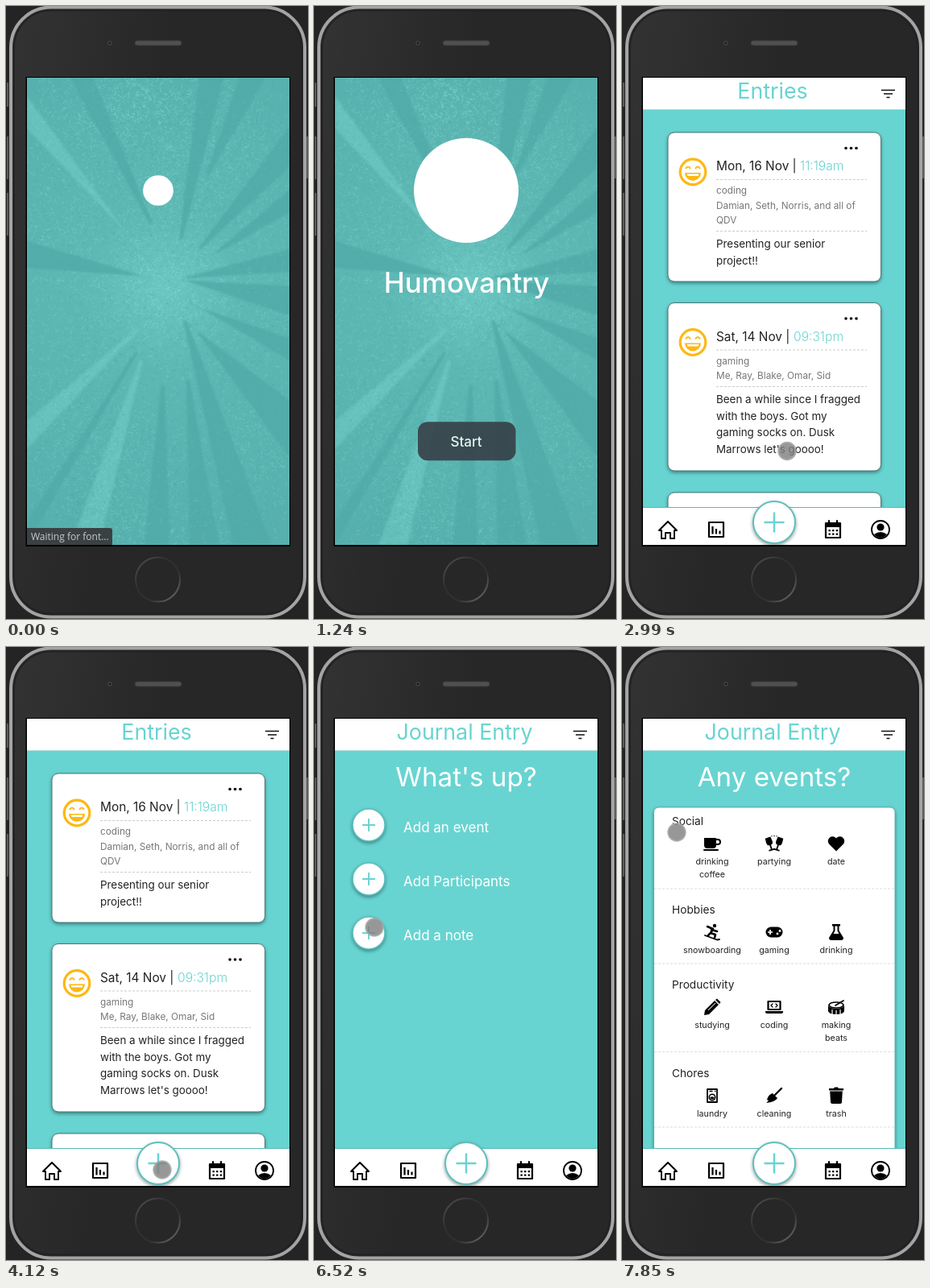
An HTML page with a canvas that plays this animation: 375x761 px, repeating every 8000 ms.

```html
<!DOCTYPE html>
<html lang="en">
<head>
<meta charset="utf-8">
<title>Mood journal walkthrough</title>
<style>
  html, body { margin: 0; width: 100%; height: 100%; overflow: hidden; background: #242424; }
  svg, canvas { position: absolute; left: 0; top: 0; }
  canvas { left: 26px; top: 89px; }
  text { font-family: Inter, "Open Sans", sans-serif; }
  .shadow { filter: drop-shadow(0 2px 2px rgba(0, 40, 40, .45)); }
</style>
</head>
<body>
<svg width="375" height="761">
  <defs>
    <linearGradient id="ring" x1="0" y1="0" x2="1" y2="1">
      <stop offset="0" stop-color="#555"/><stop offset=".35" stop-color="#303030"/>
      <stop offset=".65" stop-color="#303030"/><stop offset="1" stop-color="#777"/>
    </linearGradient>
    <linearGradient id="body" x1="0" y1="0" x2=".5" y2=".15">
      <stop offset="0" stop-color="#333"/><stop offset="1" stop-color="#272727"/>
    </linearGradient>
  </defs>
  <path d="M2 95V125M2 162V215M2 232V285M374 162V214" stroke="#5c5c5c" stroke-width="2"/>
  <rect x="6" y="1.5" width="365" height="757" rx="50" fill="url(#body)" stroke="#a4a4a4" stroke-width="4"/>
  <rect x="10" y="5.5" width="357" height="749" rx="46" fill="none" stroke="#222" stroke-width="2"/>
  <circle cx="129" cy="46" r="2.2" fill="#1a1a1a" stroke="#555"/>
  <rect x="160" y="43" width="58" height="6" rx="3" fill="#505050" stroke="#3a3a3a"/>
  <circle cx="188.5" cy="712" r="27.5" fill="#272727" stroke="url(#ring)" stroke-width="2"/>
  <rect x="24.5" y="88" width="328.5" height="583" fill="#000"/>
</svg>
<canvas id="forest" width="326" height="580"></canvas>
<svg id="ui" width="375" height="761"></svg>

<script>
const TEAL = '#68d4d1', GOLD = '#fdb813', LOOP = 8000;
const $ = id => document.getElementById(id);

// ---------- forest backdrop ----------
function paintForest() {
  const c = $('forest').getContext('2d');
  let seed = 7;
  const random = () => (seed = seed * 16807 % 2147483647) / 2147483647;
  const spread = size => (random() + random() + random() - 1.5) * size;
  const wedge = (color, x1, y1, x2, y2, tipX, tipY) => {
    c.fillStyle = color;
    c.beginPath();
    c.moveTo(x1, y1); c.lineTo(x2, y2); c.lineTo(tipX + 2, tipY); c.lineTo(tipX - 2, tipY);
    c.fill();
  };
  // Leaves gather around a point as short random twigs.
  const foliage = (x, y, size, count, color) => {
    c.strokeStyle = color;
    c.beginPath();
    for (let i = 0; i < count; i++) {
      const px = x + spread(size), py = y + spread(size);
      c.moveTo(px, py);
      c.lineTo(px + spread(5), py + spread(5));
    }
    c.stroke();
  };
  const scatter = (clumps, color) => {
    for (let i = 0; i < clumps; i++) foliage(26 + random() * 326, 89 + random() * 580, 60, 60, color);
  };
  c.translate(-26, -89);
  const glow = c.createRadialGradient(195, 350, 5, 195, 350, 330);
  glow.addColorStop(0, '#6ac5c0');
  glow.addColorStop(.3, '#5db7b3');
  glow.addColorStop(1, '#57b0ad');
  c.fillStyle = glow;
  c.fillRect(26, 89, 326, 580);
  const lit = 'rgba(122,214,208,.4)', dark = 'rgba(82,171,169,.85)';
  c.filter = 'blur(1.5px)';
  wedge(lit, 26, 112, 26, 152, 165, 300);
  wedge(lit, 26, 515, 26, 550, 165, 400);
  wedge(lit, 80, 669, 116, 669, 168, 440);
  c.filter = 'none';
  scatter(130, 'rgba(126,220,213,.3)');
  scatter(90, 'rgba(74,161,159,.25)');
  foliage(175, 112, 60, 400, 'rgba(130,224,217,.4)');
  foliage(198, 345, 70, 400, 'rgba(130,224,217,.4)');
  c.filter = 'blur(1px)';
  wedge(dark, 26, 292, 26, 325, 175, 336);
  wedge(dark, 80, 89, 108, 89, 180, 270);
  wedge(dark, 240, 89, 270, 89, 217, 290);
  wedge(dark, 290, 89, 322, 89, 250, 210);
  wedge(dark, 352, 150, 352, 200, 240, 302);
  wedge(dark, 352, 228, 352, 256, 262, 306);
  wedge(dark, 352, 302, 352, 330, 220, 338);
  wedge(dark, 352, 348, 352, 384, 218, 340);
  wedge(dark, 352, 412, 352, 440, 235, 372);
  wedge(dark, 352, 490, 352, 560, 228, 395);
  wedge(dark, 282, 669, 330, 669, 222, 390);
  wedge(dark, 228, 669, 264, 669, 226, 465);
  wedge(dark, 172, 669, 203, 669, 195, 470);
  wedge(dark, 26, 640, 26, 669, 162, 430);
  c.filter = 'none';
  scatter(25, 'rgba(126,220,213,.2)');
}

// ---------- markup helpers ----------
const text = (x, y, size, str, fill = '#222', more = '') =>
  `<text x="${x}" y="${y}" font-size="${size}" fill="${fill}" ${more}>${str}</text>`;
const MID = 'text-anchor="middle"', MEDIUM = MID + ' font-weight="500"';
const at = (x, y, body, more = '') => `<g transform="translate(${x} ${y})" ${more}>${body}</g>`;
const line = (d, color, width, more = '') =>
  `<path d="${d}" fill="none" stroke="${color}" stroke-width="${width}" ${more}/>`;
const dashes = (x1, x2, y, color = '#ccc') => line(`M${x1} ${y}H${x2}`, color, 1, 'stroke-dasharray="3 2"');
const box = (x, y, w, h, r, fill, more = '') =>
  `<rect x="${x}" y="${y}" width="${w}" height="${h}" rx="${r}" fill="${fill}" ${more}/>`;
const dot = (x, y, r, fill = '#000', more = '') => `<circle cx="${x}" cy="${y}" r="${r}" fill="${fill}" ${more}/>`;
const ink = (d, width = 2) => line(d, '#000', width, 'stroke-linecap="round" stroke-linejoin="round"');
const solid = (d, fill = '#000') => `<path d="${d}" fill="${fill}"/>`;

const plusButton = (x, y, r, arm, width) => at(x, y,
  dot(0, 0, r, '#fff', `stroke="#5fbfbc" stroke-width="${width * .8}" class="shadow"`) +
  line(`M${-arm} 0H${arm}M0 ${-arm}V${arm}`, TEAL, width));

function face(x, y, r, mouth, color = GOLD) {
  const happy = mouth === 'laugh';
  const eyes = happy ? line('M-9-4q3-5 6 0M3-4q3-5 6 0', color, 2) : dot(-6, -4, 2, color) + dot(6, -4, 2, color);
  const lips = happy
    ? solid('M-10 1H10A10 10 0 0 1-10 1z', color) + solid('M-7.5 2.5H7.5L6.5 5H-6.5z', '#fff')
    : line(`M-8 6Q0 ${6 + mouth} 8 6`, color, 2.4, 'stroke-linecap="round"');
  return at(x, y, `<g transform="scale(${r / 17.5})">` +
    dot(0, 0, 15.8, '#fff', `stroke="${color}" stroke-width="3.2"`) + eyes + lips + '</g>');
}

// ---------- icons, centred on 0,0 ----------
const icons = {
  cup: solid('M-10-7H5V2a4 4 0 0 1-4 4H-6a4 4 0 0 1-4-4z') + ink('M5-5h2a3 3 0 0 1 0 6H5M-10 8H7'),
  glasses: [-1, 1].map(s => `<g transform="translate(${s * 5} 0) scale(${s} 1) rotate(18)">` +
    solid('M-3-8H4L4.5-2A4 4 0 0 1-3.5-2z') + ink('M.5 1V8M-2.5 8H3.5', 1.8) + '</g>').join('') +
    ink('M0-10V-9M-3-9.5V-9M3-9.5V-9', 1),
  heart: solid('M0 9.5L-9 .5A5.4 5.4 0 0 1 0-6.5A5.4 5.4 0 0 1 9 .5z'),
  snowboard: dot(3, -8, 2.2) + ink('M-6-7L1-4L-2 1L4 3L3 7M-1-3L6-1M-2 1L-5 4', 2.6) + ink('M-9 4L6 9.5L9 9', 1.8),
  gamepad: box(-10.5, -6.5, 21, 13, 6.5, '#000') + line('M-8 0H-2M-5-3V3', '#fff', 1.7) +
    dot(4, 2, 1.4, '#fff') + dot(7, -1.5, 1.4, '#fff'),
  flask: solid('M-5-10H5V-7.5H3.5V-2L9 7Q9 10 6 10H-6Q-9 10-9 7L-3.5-2V-7.5H-5z') + solid('M-1.5-7.5H1.5V-1.5L3.5 2H-3.5L-1.5-1.5z', '#fff'),
  pencil: solid('M-10 10L-9 4L3-8L8-3L-4 9zM4-9L6-10.5L10.5-6L9-4z') + line('M-5 4L4-5', '#fff', 1),
  laptop: ink('M-7.5 3V-7H7.5V3z', 2.2) + ink('M-2-4L-4-2L-2 0M2-4L4-2L2 0', 1.3) + solid('M-11 5H11V6Q11 8 9 8H-9Q-11 8-11 6z'),
  drum: solid('M-10-2V5Q-9 9 0 9T10 5V-2Q8 2 0 2T-10-2z') + ink('M-9-2.5Q-8-6 0-6T9-2.5Q8 1 0 1T-9-2.5zM-1-2L9-8', 1.7) +
    line('M-5 3V9M0 4V10M5 3V9', '#fff', 1.2),
  washer: ink('M-6-8H6V8H-6z', 1.8) + ink('M-3-5.5H0M3.5-5.5H4', 1.3) + dot(0, 2, 3.7, '#fff', 'stroke="#000" stroke-width="1.6"') +
    solid('M-2.5 2Q0 .5 2.5 2A2.5 2.5 0 0 1-2.5 2z'),
  broom: ink('M9-9L1-1', 2.4) + solid('M-2-3L4 3Q1 8-10 9L-7 6L-9 5Q-7-2-2-3z'),
  trash: solid('M-9-9H-3L-2-10.5H2L3-9H9V-6.5H-9zM-7.8-5.5H7.8L7 8Q7 10 5 10H-5Q-7 10-7 8z'),
  home: ink('M-11 1L0-10L11 1H8V11H3V4H-3V11H-8V1z', 1.9),
  chart: ink('M-9-9H9V9H-9z', 2.2) + line('M-4.5-4V5.5M0-1V5.5M4.5 1.5V5.5', '#000', 2.2),
  calendar: ink('M-9-8H9V10H-9zM-5-11V-8M5-11V-8', 2.2) + solid('M-9-8H9V-3H-9z') +
    line('M-5.5 1.2H6M-5.5 5.7H6', '#000', 2.3, 'stroke-dasharray="2.3 2.3"'),
  user: dot(0, 0, 11, '#fff', 'stroke="#000" stroke-width="1.8"') + dot(0, -3, 4.6) + solid('M-8 6Q0 0 8 6A10 10 0 0 1-8 6z'),
};

// ---------- screens ----------
const chrome = title => box(26, 89, 326, 39.5, 0, '#fff') + line('M26 128.5H352', '#b5dedc', 1) +
  text(187, 115, 26.8, title, TEAL, MID) + line('M322 104.5H339M325 109H336M328.5 113.5H332.5', '#111', 1.7);

const nav = line('M26 622.5H352', '#55b9b6', 1) + box(26, 623, 326, 46, 0, '#fff') +
  [['home', 57], ['chart', 117], ['calendar', 262], ['user', 321]].map(([name, x]) => at(x, 650, icons[name])).join('') +
  plusButton(189, 641, 26, 12.5, 2.5);

const page = (id, title, body) =>
  `<g id="${id}" clip-path="url(#screen)">${box(26, 89, 326, 580, 0, TEAL)}${body}${chrome(title)}${nav}</g>`;
const heading = str => text(189, 173, 33.2, str, '#fff', MID);

function entry(y, height, date, time, timeX, tags, note) {
  const ruleY = 77 + tags.length * 18.5 - 10;
  return at(0, y,
    box(57, 0, 264.5, height, 8, '#fff', 'stroke="#4d7776" class="shadow"') +
    [278, 284.5, 291].map(x => dot(x, 19.5, 1.8)).join('') + face(88, 49, 17.5, 'laugh') +
    text(117, 47, 15.4, date) + text(timeX, 47, 15.6, time, TEAL, 'font-weight="300"') + dashes(117, 304, 58.5) +
    tags.map((tag, i) => text(117, 76 + i * 18.5, 11.8, tag, '#777')).join('') + dashes(117, 304, ruleY) +
    note.map((row, i) => text(117, ruleY + 20.5 + i * 20.7, 13.4, row)).join(''));
}

const entries = page('entries', 'Entries',
  entry(157, 185, 'Mon, 16 Nov |', '11:19am', 221, ['coding', 'Damian, Seth, Norris, and all of', 'QDV'],
    ['Presenting our senior', 'project!!']) +
  entry(368.5, 208.5, 'Sat, 14 Nov |', '09:31pm', 213, ['gaming', 'Me, Ray, Blake, Omar, Sid'],
    ['Been a while since I fragged', 'with the boys. Got my', 'gaming socks on. Dusk', "Marrows let's goooo!"]) +
  box(57, 604, 264.5, 100, 8, '#fff', 'stroke="#4d7776" class="shadow"'));

const moods = page('moods', 'Journal Entry', heading('How are you?') +
  ['laugh', 7, 0, -4, -8].map((mouth, i) => face(62 + i * 63.5, 348, 26, mouth)).join(''));

const options = page('options', 'Journal Entry', heading("What's up?") +
  ['Add an event', 'Add Participants', 'Add a note'].map((label, i) =>
    plusButton(68, 221 + i * 67, 20, 8, 1.9) + text(111, 230 + i * 67, 17, label, '#fff')).join(''));

const groups = [
  [221, 300, 'Social', ['cup', 'drinking', 'coffee'], ['glasses', 'partying'], ['heart', 'date']],
  [331, 393, 'Hobbies', ['snowboard', 'snowboarding'], ['gamepad', 'gaming'], ['flask', 'drinking']],
  [424, 502.5, 'Productivity', ['pencil', 'studying'], ['laptop', 'coding'], ['drum', 'making', 'beats']],
  [534, 596, 'Chores', ['washer', 'laundry'], ['broom', 'cleaning'], ['trash', 'trash']],
];
const events = page('events', 'Journal Entry', heading('Any events?') +
  box(39.5, 199, 299.5, 460, 6, '#fff', 'stroke="#52b3b0" class="shadow"') +
  groups.map(([y, rule, name, ...items]) => text(62, y, 13.7, name) + dashes(40, 339, rule, '#ddd') +
    items.map(([icon, ...labels], i) => at(112 + i * 77, y, at(0, 23, icons[icon]) +
      labels.map((label, row) => text(0, 49 + row * 16, 10.7, label, '#222', MID)).join(''))).join('')).join(''));

const splash = `<g id="splash">
  <circle id="logo" cx="189" cy="229" r="65" fill="#fff"/>
  <g id="title">${text(189.5, 358, 35, 'Humovantry', '#fff', MEDIUM)}</g>
  <g id="start">${box(129, 523, 121.5, 48, 12, '#343a42')}${text(189, 554, 17, 'Start', '#fff', MEDIUM)}</g>
  <g id="status"><path d="M26 648H129q3 0 3 3V669H26z" fill="#3a4143"/>
    ${text(31, 663, 12, 'Waiting for font...', '#c5cbcc', 'style="font-family:Open Sans,sans-serif"')}</g></g>`;

paintForest();
$('ui').innerHTML = '<defs><clipPath id="screen"><rect x="26" y="89" width="326" height="580"/></clipPath></defs>' +
  splash + entries + moods + options + events + '<circle id="cursor" r="10.7" stroke-width="2"/>';

// ---------- timeline ----------
const clamp = x => Math.min(1, Math.max(0, x));
const smooth = x => (x = clamp(x), x * x * (3 - 2 * x));
const show = (id, on) => $(id).setAttribute('display', on ? 'inline' : 'none');

const screens = [['splash', 0], ['entries', 2890], ['moods', 4950], ['options', 6430], ['events', 7710]];
const clicks = [[2750, 2950], [4890, 5020], [6370, 6500], [7620, 7800]];
const logoSizes = [[30, .29], [250, 1.25], [430, .94], [600, 1]];
// start, end, then from, control and to points
const moves = [
  [1700, 2380, 325, 773, 265, 660, 205, 552.5],
  [3790, 4120, 205, 552.5, 200, 600, 194, 649],
  [5450, 6110, 194, 649, 170, 482, 75, 348],
  [6800, 7290, 75, 348, 76, 290, 68, 230],
];

function logoScale(t) {
  let scale = logoSizes[0][1];
  for (let i = 1; i < logoSizes.length; i++) {
    const [t0, a] = logoSizes[i - 1], [t1, b] = logoSizes[i];
    if (t > t0) scale = a + (b - a) * smooth((t - t0) / (t1 - t0));
  }
  return scale;
}

function drop(id, opacity, offset) {
  $(id).setAttribute('opacity', opacity);
  $(id).setAttribute('transform', `translate(0 ${-offset})`);
}

function render(t) {
  const current = screens.filter(([, from]) => t >= from).pop()[0];
  screens.forEach(([id]) => show(id, id === current));

  show('status', t < 80);
  $('logo').setAttribute('r', 65 * logoScale(t));
  drop('title', clamp((t - 480) / 440), 9 * Math.exp((730 - t) / 340));
  const left = Math.exp(-Math.max(0, t - 750) / 250);
  drop('start', 1 - left, 48 * left);

  const move = moves.filter(m => t >= m[0]).pop();
  show('cursor', move);
  if (!move) return;
  const [from, to, x0, y0, x1, y1, x2, y2] = move;
  const u = smooth((t - from) / (to - from)), v = 1 - u;
  const cursor = $('cursor'), pressed = clicks.some(([a, b]) => t >= a && t < b);
  cursor.setAttribute('cx', v * v * x0 + 2 * u * v * x1 + u * u * x2);
  cursor.setAttribute('cy', v * v * y0 + 2 * u * v * y1 + u * u * y2);
  cursor.setAttribute('fill', pressed ? 'rgba(158,152,0,.85)' : 'rgba(128,128,128,.82)');
  cursor.setAttribute('stroke', pressed ? 'rgba(190,182,30,.9)' : 'rgba(165,165,165,.85)');
}

const begin = performance.now();
function tick() {
  render((performance.now() - begin) % LOOP);
  requestAnimationFrame(tick);
}
tick();
</script>
</body>
</html>
```
